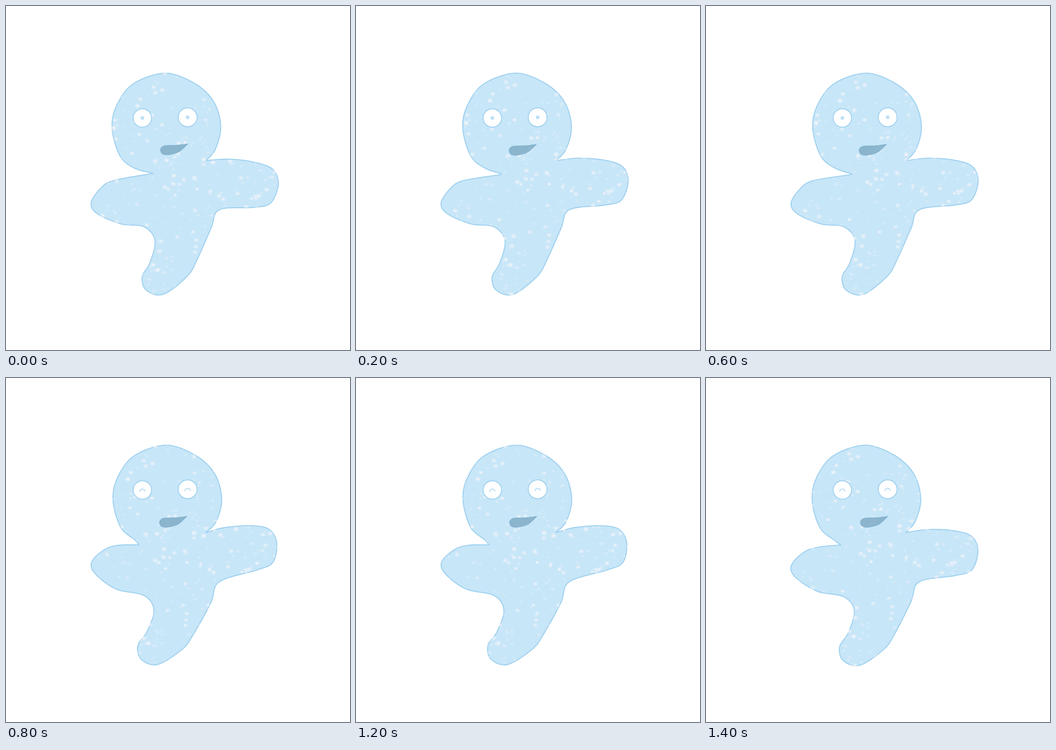
Animation, 748 px wide and 748 px high, one loop 1.6 s. Source, as an HTML page with a canvas:

```html
<!DOCTYPE html>
<html lang="en">
<head>
<meta charset="utf-8">
<title>Glitter ghost</title>
<style>
html, body { margin: 0; width: 100%; height: 100%; overflow: hidden; background: #fff; }
canvas { display: block; width: 748px; height: 748px; }
</style>
</head>
<body>
<canvas id="stage" width="748" height="748"></canvas>
<script>
const ctx = document.getElementById('stage').getContext('2d');
const FILL = '#c7e6f8', LINE = '#9dd0ef';
const STEP = 200;
const ORDER = [0, 1, 0, 1, 2, 3, 2, 3];

// limb angles in degrees, left neck point, head and mouth offset, glitter offset
const POSES = [
  { right: 0, left: 0, tail: 0, neck: [320, 364], head: 0, mouth: [0, 0], glitter: [0, 0] },
  { right: -3, left: 0, tail: 0, neck: [319, 366], head: 1.5, mouth: [-3, 1], glitter: [5.5, -11] },
  { right: -12, left: 13, tail: 5, neck: [289, 363], head: 2, mouth: [-2, 1], glitter: [-21, 3], shut: true },
  { right: -5, left: 9, tail: 3, neck: [293, 363], head: 0, mouth: [0, 1], glitter: [-9, -12], shut: true }
];

const HEAD = [[278, 352], [248, 326], [231, 270], [238, 222], [274, 171], [345, 146],
  [408, 167], [451, 207], [467, 262], [455, 312]];
const RIGHT_ARM = [[490, 333], [550, 342], [583, 358], [592, 390], [575, 429], [538, 438]];
const LEFT_ARM = [[250, 474], [199, 452], [185, 428], [207, 395], [236, 379]];
const TAIL = [[446, 483], [414, 555], [393, 589], [342, 627], [305, 618], [296, 589],
  [313, 558], [324, 510], [300, 480]];
const MOUTH = [[395, 300], [370, 303], [345, 304], [336, 312], [341, 322], [355, 323],
  [376, 317], [395, 300]];
const EYES = [[296.5, 243.5, 20], [395, 242, 20.5]];

let seed = 71;
const rand = () => (seed = (seed * 16807) % 2147483647) / 2147483647;

const scatter = (count, size, alpha) => Array.from({ length: count }, () => ({
  x: 170 + rand() * 450,
  y: 135 + rand() * 510,
  r: size * (0.8 + rand() * 0.4),
  a: alpha * (0.7 + rand() * 0.3)
}));
const glitter = [...scatter(150, 5.6, 0.9), ...scatter(350, 4, 0.42)];

const shift = (points, dx, dy) => points.map(([x, y]) => [x + dx, y + dy]);

function swing(points, px, py, degrees) {
  const c = Math.cos(degrees * Math.PI / 180), s = Math.sin(degrees * Math.PI / 180);
  return points.map(([x, y]) => [px + (x - px) * c - (y - py) * s, py + (x - px) * s + (y - py) * c]);
}

// smooth open curve through the points
function curve(path, p) {
  const at = i => p[Math.max(0, Math.min(p.length - 1, i))];
  path.lineTo(...p[0]);
  for (let i = 0; i < p.length - 1; i++) {
    const [a, b, c, d] = [at(i - 1), at(i), at(i + 1), at(i + 2)];
    path.bezierCurveTo(
      b[0] + (c[0] - a[0]) / 6, b[1] + (c[1] - a[1]) / 6,
      c[0] - (d[0] - b[0]) / 6, c[1] - (d[1] - b[1]) / 6, c[0], c[1]);
  }
}

function shape(...curves) {
  const path = new Path2D();
  curves.forEach(p => curve(path, p));
  path.closePath();
  return path;
}

function disc(x, y, r) {
  const path = new Path2D();
  path.arc(x, y, r, 0, 2 * Math.PI);
  return path;
}

function outline(pose) {
  const nape = [435, 336], armpit = [464, 443];
  return shape(
    [pose.neck, ...shift(HEAD, pose.head, 0), nape],
    [nape, ...swing(RIGHT_ARM, 445, 390, pose.right), armpit,
      ...swing(TAIL, 380, 480, pose.tail),
      ...swing(LEFT_ARM, 310, 420, pose.left), pose.neck]);
}

function paint(path, fill, line, width) {
  ctx.fillStyle = fill;
  ctx.fill(path);
  ctx.strokeStyle = line;
  ctx.lineWidth = width;
  ctx.stroke(path);
}

function drawGlitter(dx, dy) {
  ctx.globalCompositeOperation = 'source-atop';
  for (const { x, y, r, a } of glitter) {
    ctx.save();
    ctx.translate(x + dx, y + dy);
    ctx.scale(1.15, 0.95);
    const g = ctx.createRadialGradient(0, 0, 0, 0, 0, r);
    g.addColorStop(0, `rgba(255,251,250,${a})`);
    g.addColorStop(0.4, `rgba(251,246,249,${a * 0.65})`);
    g.addColorStop(1, 'rgba(240,244,250,0)');
    ctx.fillStyle = g;
    ctx.fillRect(-r, -r, 2 * r, 2 * r);
    ctx.restore();
  }
  ctx.globalCompositeOperation = 'source-over';
}

function drawEye([x, y, r], shut) {
  paint(disc(x, y, r), '#fff', LINE, 1.9);
  if (!shut) {
    ctx.fillStyle = '#bfe1f6';
    ctx.fill(disc(x, y, 4));
    return;
  }
  ctx.beginPath();
  ctx.arc(x, y + 4, 6, 1.05 * Math.PI, 1.9 * Math.PI);
  ctx.strokeStyle = '#b5dcf4';
  ctx.lineWidth = 2;
  ctx.stroke();
}

function draw(pose) {
  ctx.clearRect(0, 0, 748, 748);
  ctx.lineJoin = ctx.lineCap = 'round';
  paint(outline(pose), FILL, LINE, 2.1);
  drawGlitter(...pose.glitter);
  paint(shape(shift(MOUTH, ...pose.mouth)), 'rgba(130,174,198,0.86)', '#80b2d1', 1.4);
  EYES.forEach(eye => drawEye(eye, pose.shut));
}

let shown;
const start = performance.now();
function tick() {
  const t = Math.max(0, performance.now() - start);
  const pose = POSES[ORDER[Math.floor(t / STEP) % ORDER.length]];
  if (pose !== shown) draw(shown = pose);
  requestAnimationFrame(tick);
}
tick();
</script>
</body>
</html>
```
